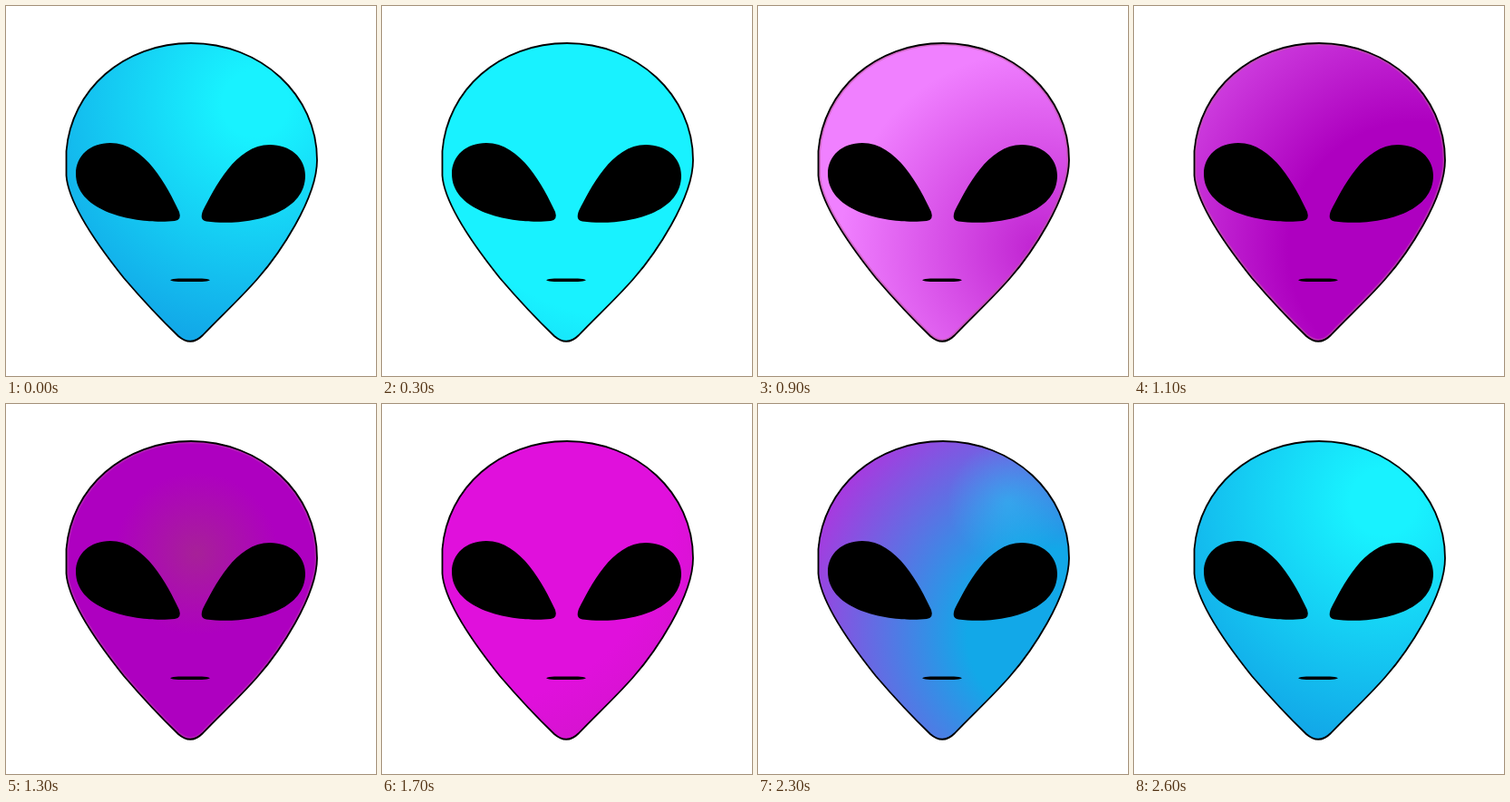
These frames come from a looping animation (408x408 px, 2700 ms). An HTML page with a canvas:

```html
<!DOCTYPE html>
<html lang="en">
<head>
<meta charset="utf-8">
<title>Alien</title>
<style>
  html, body { margin: 0; height: 100%; overflow: hidden; background: #fff; }
  canvas { display: block; }
</style>
</head>
<body>
<canvas id="stage" width="408" height="408"></canvas>
<script>
const ctx = document.getElementById('stage').getContext('2d');

const head = new Path2D('M204 41C281 41 343 98 343 170C343 213 300 275 278 300C260 321 236 343 217 363Q204 376 190 364C166 341 148 321 130 300C106 270 69 221 66.500 187V160C72 92 130 41 204 41Z');
const features = new Path2D(
  'M77 185C77 165 93 151 115 151C153 151 178 199 191 227Q194 236 186 237C150 241 77 230 77 185Z' +
  'M330 187C330 167 313 153 291 153C253 153 230 201 217 226Q213 236 221 237.500C262 243 330 232 330 187Z' +
  'M181 302.300Q184 300.600 190 300.600H216Q222 300.600 225 302.300Q222 304 216 304H190Q184 304 181 302.300Z');

const STEP = 100, LOOP = 2700, CYCLE = 26;
const BLUE = '18,168,232', CYAN = '24,242,255';

// Soft discs of colour that spread over the head; start and end are in steps.
const waves = [
  { rgb: CYAN, x: 275, y: 108, start: -4, end: 5, reach: 600, soft: 230, power: 1 },
  { rgb: '240,128,255', x: 120, y: 330, start: 4, end: 9, reach: 680, soft: 330, power: 1.28 },
  { rgb: '174,0,192', x: 310, y: 268, start: 7, end: 13, reach: 660, soft: 300, power: 1 },
  { rgb: '166,36,148', x: 210, y: 165, start: 12, end: 17, reach: 450, soft: 100, power: 1 },
  { rgb: '224,16,220', x: 100, y: 110, start: 13, end: 18, reach: 750, soft: 380, power: 1 },
  { rgb: BLUE, x: 325, y: 255, start: 16, end: 26, reach: 650, soft: 260, power: 1.7 },
  { rgb: CYAN, x: 275, y: 108, start: 22, end: 31, reach: 600, soft: 230, power: 1 },
];

function spread({ rgb, x, y, start, end, reach, soft, power }, step) {
  const progress = Math.min(1, (step - start) / (end - start));
  if (progress <= 0) return;
  const radius = reach * progress ** power;
  const fill = ctx.createRadialGradient(x, y, Math.max(0, radius - soft), x, y, radius);
  fill.addColorStop(0, `rgba(${rgb},${Math.min(1, radius / soft)})`);
  fill.addColorStop(1, `rgba(${rgb},0)`);
  ctx.fillStyle = fill;
  ctx.fillRect(0, 0, 408, 408);
}

function draw(now) {
  const step = Math.floor(now % LOOP / STEP) % CYCLE;
  ctx.fillStyle = '#fff';
  ctx.fillRect(0, 0, 408, 408);

  ctx.save();
  ctx.clip(head);
  ctx.fillStyle = `rgb(${BLUE})`;
  ctx.fillRect(0, 0, 408, 408);
  waves.forEach(wave => spread(wave, step));
  const rim = Math.max(0, Math.sin(Math.PI * (step - 4) / 11)) * 0.6;
  ctx.strokeStyle = `rgba(190,90,160,${rim})`;
  ctx.lineWidth = 5;
  ctx.stroke(head);
  ctx.restore();

  ctx.strokeStyle = ctx.fillStyle = '#000';
  ctx.lineWidth = 1.8;
  ctx.stroke(head);
  ctx.fill(features);
}

const begin = performance.now();
(function tick() {
  draw(performance.now() - begin);
  requestAnimationFrame(tick);
})();
</script>
</body>
</html>
```
